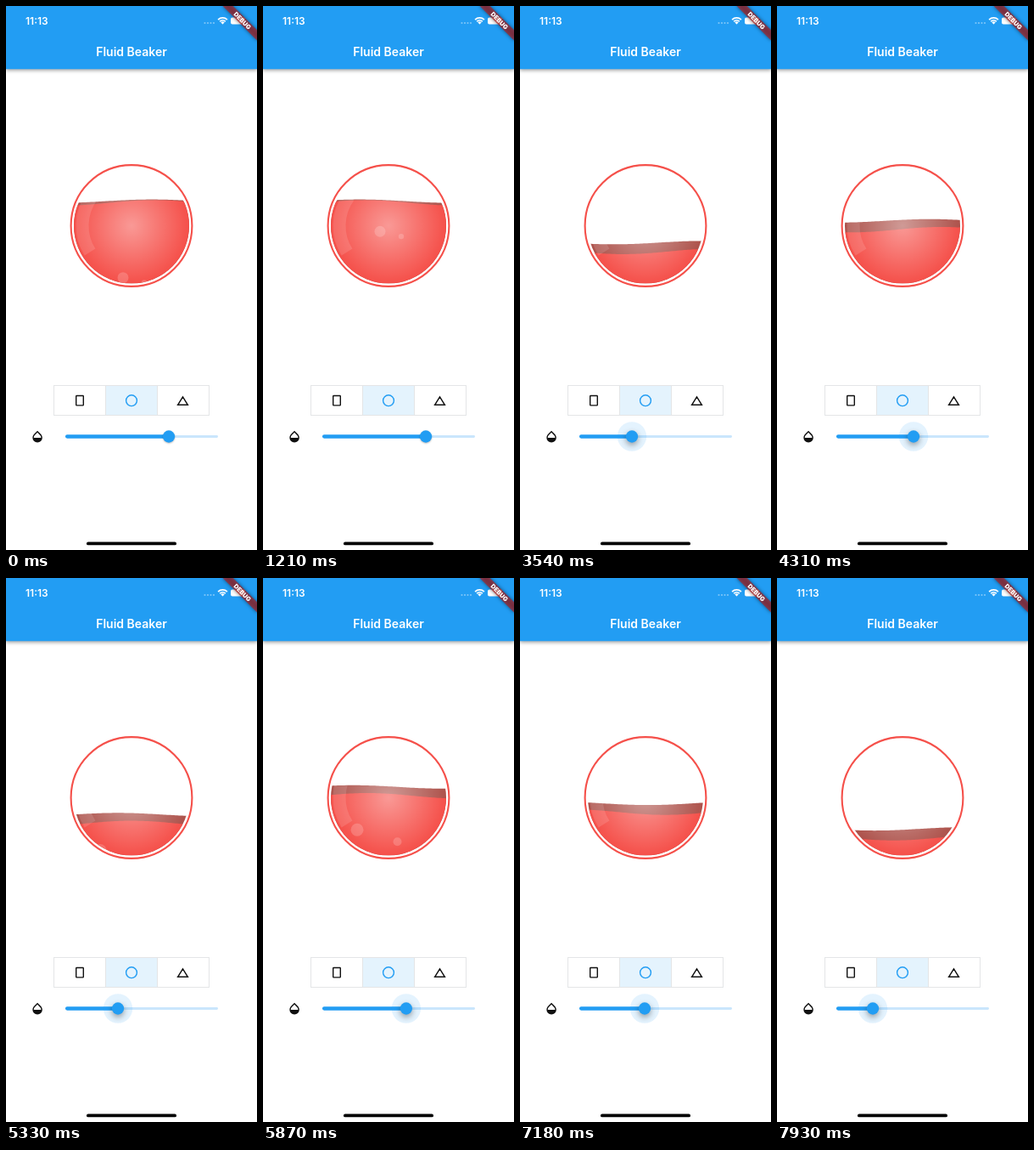
Write an HTML page with a canvas that moves like this. It is 296x640 px and loops after 8000 ms.

```html
<!DOCTYPE html>
<html lang="en">
<head>
<meta charset="utf-8">
<title>Fluid Beaker</title>
<style>
html, body { margin: 0; width: 100%; height: 100%; overflow: hidden; background: #fff; }
canvas { display: block; width: 296px; height: 640px; }
</style>
</head>
<body>
<canvas id="stage"></canvas>
<script>
const W = 296, H = 640, LOOP = 8000, TAU = Math.PI * 2;
const BLUE = '#229df3', RED = '#f5504a', DARK = '#ad524b', INK = '#111';
const CX = 148, CY = 258.5, R = 68;
const TRACK = { x: 70, y: 506.5, w: 180 };
const TOUCH = 1900; // the finger lands on the slider
const canvas = document.getElementById('stage');
const c = canvas.getContext('2d');
const dpr = window.devicePixelRatio || 1;
canvas.width = W * dpr;
canvas.height = H * dpr;

// Turning points of the drag: time, thumb x
const drag = [[TOUCH, 192], [2400, 179], [3540, 132], [4310, 161], [5330, 132], [6320, 192], [7930, 113]];

// Bubbles: birth time, x, radius
const bubbles = [[-150, 138, 6.5], [-20, 163, 3.2], [1500, 163, 6.8], [5200, 111, 7.5], [5510, 158.5, 5]];

const dropIcon = new Path2D('M17.66 8L12 2.35 6.34 8C4.78 9.56 4 11.64 4 13.64s.78 4.11 2.34 5.67 ' +
  '3.61 2.35 5.66 2.35 4.1-.79 5.66-2.35S20 15.64 20 13.64 19.22 9.56 17.66 8zM6 14c.01-2 ' +
  '.62-3.27 1.76-4.4L12 5.27l4.24 4.38C17.38 10.77 17.99 12 18 14H6z');

const clamp = v => Math.max(0, Math.min(1, v));
const ease = p => (1 - Math.cos(Math.PI * clamp(p))) / 2;

// Smooth curve through the drag points, at rest at both ends
function thumbX(t) {
  const last = drag.length - 1;
  if (t <= drag[0][0]) return drag[0][1];
  if (t >= drag[last][0]) return drag[last][1];
  const slope = i => i === 0 || i === last ? 0 :
    (drag[i + 1][1] - drag[i - 1][1]) / (drag[i + 1][0] - drag[i - 1][0]);
  const i = drag.findIndex(k => k[0] > t) - 1;
  const [t0, x0] = drag[i], [t1, x1] = drag[i + 1];
  const span = t1 - t0, p = (t - t0) / span, q = 1 - p;
  return x0 * (1 + 2 * p) * q * q + x1 * (1 + 2 * q) * p * p +
    span * p * q * (slope(i) * q - slope(i + 1) * p);
}

function rect(x, y, w, h, fill, r = 0) {
  c.fillStyle = fill;
  c.beginPath();
  c.roundRect(x, y, w, h, r);
  c.fill();
}

function disc(x, y, r, fill) {
  c.fillStyle = fill;
  c.beginPath();
  c.arc(x, y, r, 0, TAU);
  c.fill();
}

function ring(x, y, r, width, color, from = 0, to = TAU) {
  c.strokeStyle = color;
  c.lineWidth = width;
  c.beginPath();
  c.arc(x, y, r, from, to);
  c.stroke();
}

function text(str, x, y, font, align) {
  c.font = font + ' Inter, Roboto, sans-serif';
  c.textAlign = align;
  c.fillStyle = '#fff';
  c.fillText(str, x, y);
}

function shadow(color, blur, y) {
  c.shadowColor = color;
  c.shadowBlur = blur * dpr;
  c.shadowOffsetY = y * dpr;
}

function header() {
  c.save();
  shadow('rgba(0,0,0,.35)', 4, 1.5);
  rect(0, 0, W, 74.3, BLUE);
  c.restore();
  text('11:13', 23, 22, '600 12px', 'left');
  text('Fluid Beaker', CX, 59.3, '600 14px', 'center');
  for (let i = 0; i < 4; i++) disc(234.5 + i * 3.5, 20, 1.1, 'rgba(255,255,255,.42)');
  const from = -Math.PI * 0.75, to = -Math.PI * 0.25;
  for (const r of [7.6, 4.6, 1.6]) ring(255.5, 21.5, r, r < 2 ? 3 : 1.8, '#fff', from, to);
  rect(265, 13.5, 17, 8, '#fff', 2);
}

function banner() {
  c.save();
  c.translate(W, 0);
  c.rotate(Math.PI / 4);
  c.filter = `blur(${2.2 * dpr}px)`;
  rect(-28.6, 20, 57.2, 8.6, 'rgba(0,0,0,.5)');
  c.filter = 'none';
  rect(-28.6, 20, 57.2, 8.6, 'rgba(183,28,28,.63)');
  text('DEBUG', 0, 27, '900 7.3px', 'center');
  c.restore();
}

function wave(y, amp, phase, fill) {
  c.beginPath();
  c.moveTo(CX - R, CY + R);
  for (let x = -R; x <= R; x += 2) c.lineTo(CX + x, y - amp * Math.cos(2 * x / R - phase));
  c.lineTo(CX + R, CY + R);
  c.closePath();
  c.fillStyle = fill;
  c.fill();
}

function bottle(t, level) {
  const stir = ease((t - TOUCH) / 1100); // dragging pulls the two waves apart
  const gap = 1 + 4.2 * stir;
  c.save();
  c.beginPath();
  c.arc(CX, CY, R, 0, TAU);
  c.clip();
  wave(level - gap, 2, 0.7 - t * 0.0014, DARK);
  wave(level + gap, 3.2, 0.8 - t * 0.00133, RED);

  c.save();
  c.clip();
  for (const [birth, x, r] of bubbles) {
    const y = CY + R - (t - birth) * 0.045;
    const alpha = 0.18 * clamp((y - level) / 25);
    if (t > birth) disc(x, y, r, `rgba(255,255,255,${alpha})`);
  }
  c.restore();

  const gloss = c.createRadialGradient(CX, CY, 0, CX, CY, R);
  gloss.addColorStop(0, 'rgba(255,255,255,.42)');
  gloss.addColorStop(1, 'rgba(255,255,255,0)');
  disc(CX, CY, R, gloss);
  ring(CX, CY, 58, 15, 'rgba(255,255,255,.13)', Math.PI * 0.82, Math.PI * 1.2);
  c.restore();
  ring(CX, CY, 71.4, 2.1, RED);
}

function buttons() {
  rect(117.5, 447, 61, 35, '#e4f3fd');
  c.strokeStyle = '#e4e5e7';
  c.lineWidth = 1;
  for (let i = 0; i < 3; i++) c.strokeRect(56.5 + 61 * i, 446.5, 61, 35);

  c.strokeStyle = INK;
  c.lineWidth = 1.43;
  c.beginPath();
  c.roundRect(82.7, 458.5, 8.6, 11.4, 0.7);
  c.moveTo(208.5, 459.9);
  c.lineTo(214.4, 469.3);
  c.lineTo(202.6, 469.3);
  c.closePath();
  c.stroke();
  ring(CX, 464.2, 6.4, 1.43, BLUE);
}

function slider(x, press) {
  const { x: left, y, w } = TRACK;
  c.save();
  c.translate(28.5, 498);
  c.scale(0.715, 0.715);
  c.fillStyle = INK;
  c.fill(dropIcon);
  c.restore();
  rect(left, y - 1.45, w, 2.9, '#cae6fc', 1.45);
  rect(left, y - 2.15, x - left, 4.3, BLUE, 2.15);
  disc(x, y, 17.2 * press, 'rgba(34,157,243,.12)');
  c.save();
  shadow(`rgba(0,0,0,${0.25 + 0.12 * press})`, 2 + 5 * press, 1 + 2 * press);
  disc(x, y, 7.15, BLUE);
  c.restore();
}

function draw(now) {
  const t = now % LOOP;
  const x = thumbX(t);
  const level = 338.3 - 0.883 * (x - TRACK.x);
  c.setTransform(dpr, 0, 0, dpr, 0, 0);
  rect(0, 0, W, H, '#fff');
  header();
  bottle(t, level);
  buttons();
  slider(x, ease((t - TOUCH) / 120));
  rect(95, 630.6, 106, 3.7, '#000', 1.85);
  banner();
  requestAnimationFrame(draw);
}
requestAnimationFrame(draw);
</script>
</body>
</html>
```
